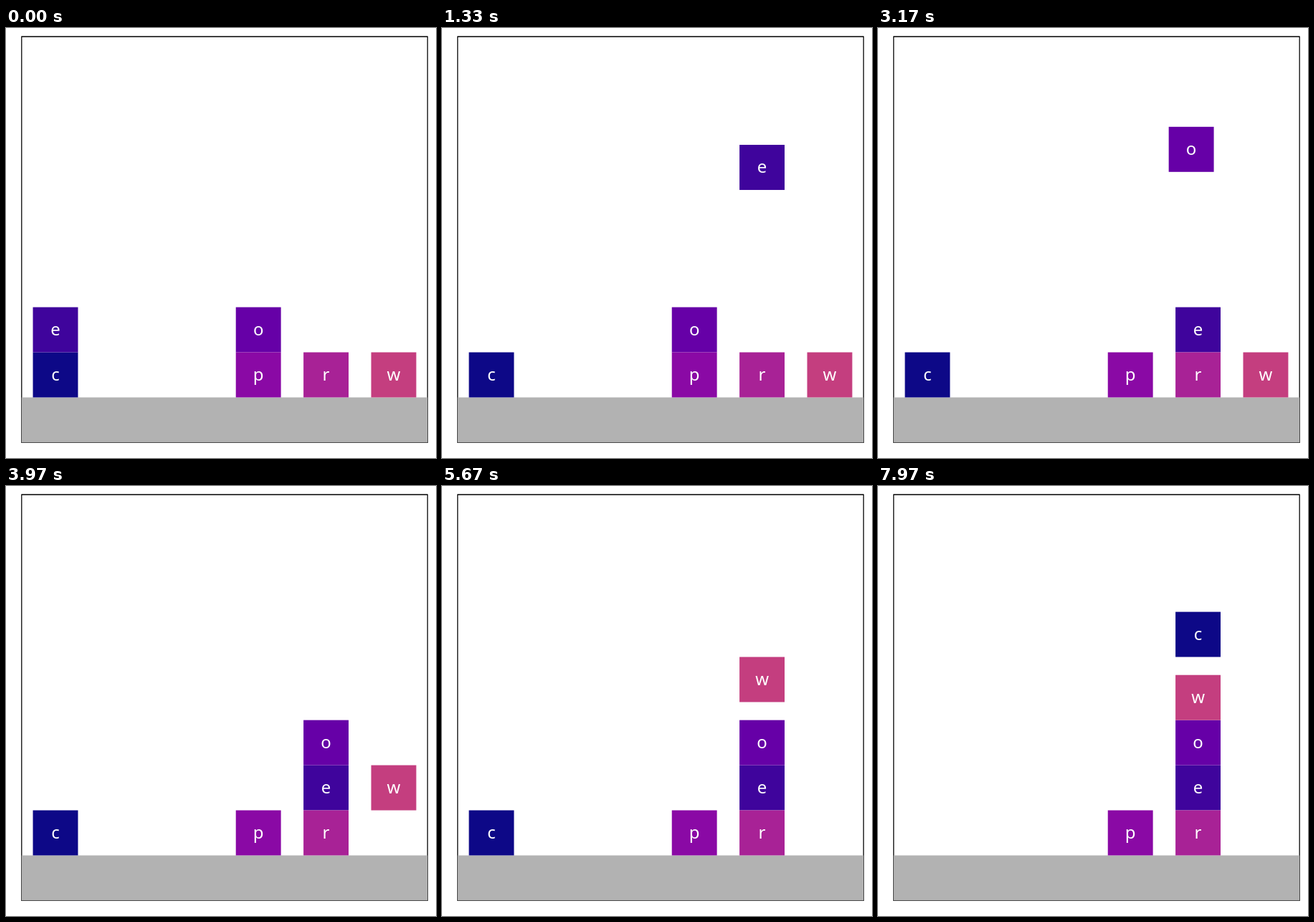
Recreate the animation shown at these times as an HTML page. Size 600 by 600 pixels, loop 8 s.

```html
<!DOCTYPE html>
<html>
<head>
<meta charset="utf-8">
<style>
html, body { margin: 0; width: 100%; height: 100%; overflow: hidden; background: #fff; }
svg { display: block; }
text { font: 24px "Noto Sans", "Open Sans", sans-serif; fill: #fff; text-anchor: middle; }
</style>
</head>
<body>
<svg id="stage" width="600" height="600" viewBox="0 0 600 600">
  <rect x="21.8" y="12" width="566.4" height="566.4" fill="#fff" stroke="#000" stroke-width="1.26" stroke-linejoin="round"/>
  <rect x="21.8" y="515.44" width="566.4" height="62.96" fill="#b2b2b2"/>
</svg>
<script>
const UNIT = 62.93, LEFT = 21.8, TOP = 12, LOOP = 8000;
const CARRY_ROW = 2, CYCLE = 58;

// name: [column, row, colour]
const start = {
  c: [0, 7, '#0d0887'],
  e: [0, 6, '#3f049c'],
  o: [3, 6, '#6600a7'],
  p: [3, 7, '#8a09a5'],
  r: [4, 7, '#a82296'],
  w: [5, 7, '#c43e7f']
};
// block, target column, target row
const moves = [['e', 4, 6], ['o', 4, 5], ['w', 4, 4], ['c', 4, 3], ['c', 4, 3]];

const svg = document.getElementById('stage');
function add(parent, tag, attrs) {
  const el = document.createElementNS('http://www.w3.org/2000/svg', tag);
  for (const key in attrs) el.setAttribute(key, attrs[key]);
  return parent.appendChild(el);
}

const blocks = {};
for (const name in start) {
  const g = blocks[name] = add(svg, 'g', {});
  add(g, 'rect', { width: UNIT, height: UNIT, fill: start[name][2] });
  add(g, 'text', { x: UNIT / 2, y: 39.4 }).textContent = name;
}

const clamp = v => Math.max(0, Math.min(1, v));
const mix = (a, b, k) => a + (b - a) * k;

// Lift, pause, carry sideways, lower; s counts steps within one move.
function carry([col, row], [, toCol, toRow], s) {
  const lift = s < 1 ? 0 : clamp((s + 1) / 20);
  const slide = s < 30 ? 0 : clamp((s - 28) / 10);
  const drop = clamp((s - 38) / 20);
  const y = s < 38 ? mix(row, CARRY_ROW, lift) : mix(CARRY_ROW, toRow, drop);
  return [mix(col, toCol, slide), y];
}

function draw(t) {
  const step = Math.floor(Math.floor(t / 10) * 0.3 + 0.15);
  const pos = {};
  for (const name in start) pos[name] = start[name];
  moves.forEach((move, i) => {
    const s = step - i * CYCLE;
    if (s >= 0) pos[move[0]] = carry(pos[move[0]], move, Math.min(s, CYCLE));
  });
  for (const name in pos) {
    const [col, row] = pos[name];
    const x = LEFT + (0.25 + 1.5 * col) * UNIT, y = TOP + row * UNIT;
    blocks[name].setAttribute('transform', `translate(${x.toFixed(2)} ${y.toFixed(2)})`);
  }
}

function tick() {
  draw(performance.now() % LOOP);
  requestAnimationFrame(tick);
}
tick();
</script>
</body>
</html>
```
